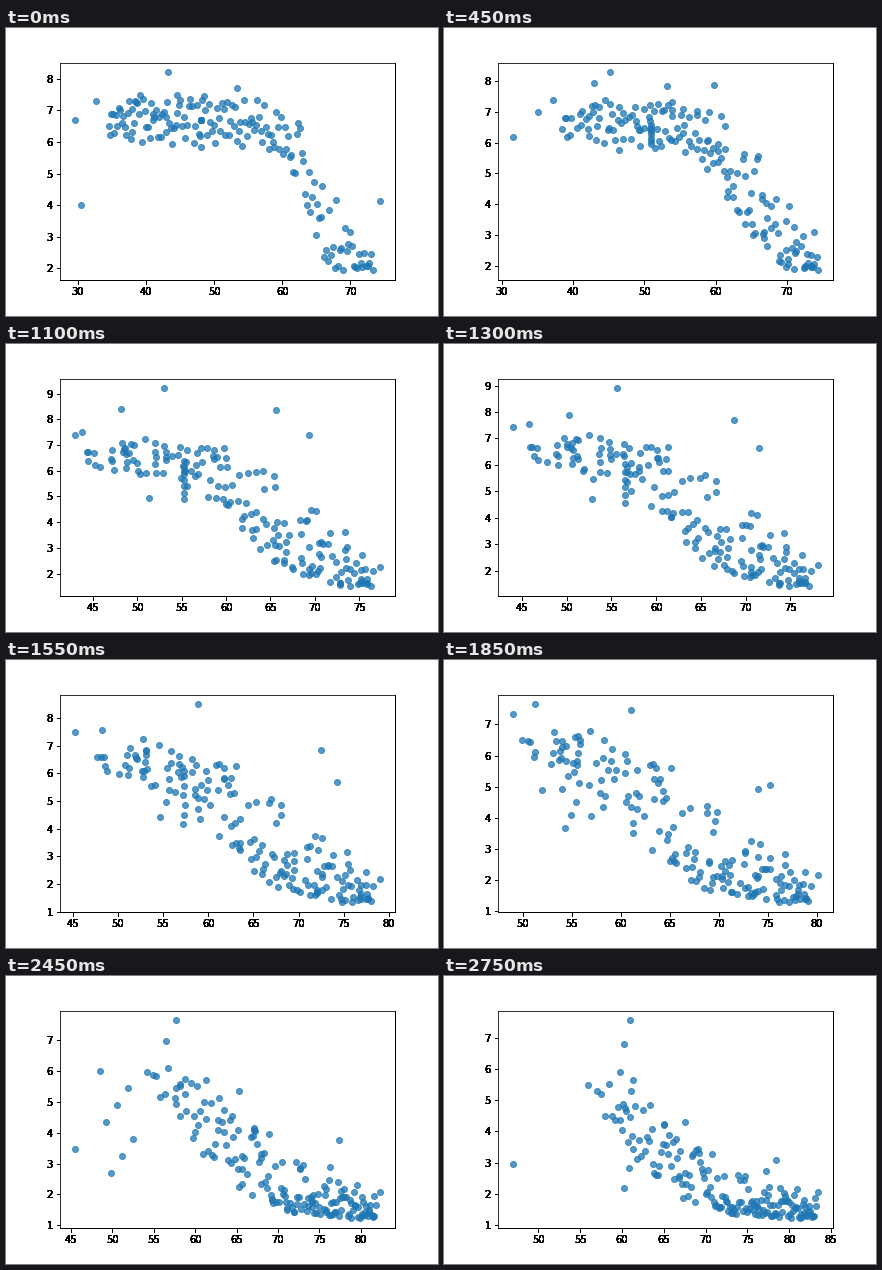
A matplotlib script that plays this animation: 432 px wide and 288 px high, repeating every 2.8 s.

```python
import numpy as np
import matplotlib.pyplot as plt
from matplotlib.animation import FuncAnimation
from matplotlib.axes import Axes

FRAMES = 56          # one frame per year
STEP_MS = 50
COUNT = 160

rng = np.random.default_rng(7)
rank_start = np.linspace(0, 1, COUNT)
shuffled = np.argsort(np.argsort(rank_start + rng.normal(0, 0.06, COUNT)))
rank_end = shuffled / (COUNT - 1)
share = rng.beta(1.5, 1.5, COUNT)

# Countries that stand apart: key points (year, life, births),
# then an optional sudden loss of life years (year, width, depth).
PATHS = [
    ([(0, 74.3, 4.13), (9, 73.8, 3.1), (22, 77.3, 2.25), (55, 83.4, 2.05)], None),
    ([(0, 38.5, 7.25), (15, 46, 8.4), (22, 53, 9.2), (31, 58.9, 8.5), (55, 67.5, 4.3)], None),
    ([(0, 44.6, 7.5), (22, 65.6, 8.35), (31, 72.5, 6.85), (43, 75.4, 3), (55, 77.2, 2.75)], None),
    ([(0, 53.3, 7.7), (15, 64, 8), (22, 69.4, 7.4), (31, 74.2, 5.7), (55, 78.4, 3.1)], None),
    ([(0, 32.7, 7.3), (43, 54.3, 7.7), (55, 61, 7.55)], None),
    ([(0, 29.6, 6.7), (22, 43, 7.4), (31, 45.3, 7.5), (55, 60.2, 6.8)], None),
    ([(0, 48, 5.85), (31, 60, 5.75), (43, 44, 4), (55, 47, 2.95)], None),
    ([(0, 43.2, 8.2), (22, 48.2, 8.4), (55, 65, 4.2)], (34, 0.5, 41)),
    ([(0, 38, 6.3), (55, 61.3, 5.65)], (8.5, 1.5, 11.4)),
    ([(0, 45, 4), (9, 59.2, 5.65), (22, 65.6, 2.55), (55, 76, 1.6)], (0, 1.2, 14.5)),
    ([(0, 41, 6.9), (22, 51, 5.9), (55, 66.8, 2.5)], (15.5, 2, 27.9)),
    ([(0, 43, 6.3), (55, 63.7, 2.95)], (50, 0.5, 30)),
]


def bell(x, centre, width):
    return np.exp(-((x - centre) / width) ** 2)


def fall(x, centre, width):
    """Smooth step from one down to zero."""
    return 1 / (1 + np.exp((x - centre) / width))


def crowd(year):
    """Most countries: life from rank, births between a low and a high curve."""
    t = year / (FRAMES - 1)
    shortest = 34.5 + 21.5 * t
    longest = 73.3 + 9.9 * t ** 1.2
    rank = rank_start + (rank_end - rank_start) * t
    life = shortest + (longest - shortest) * rank ** (0.65 + 0.4 * np.exp(-4 * t))

    floor = 1.2 + 0.7 * bell(t, 0, 0.38)
    low = floor + (5.8 - floor) * fall(life, 63 - 3 * t, 1.3 + 2.8 * np.sqrt(t))
    floor = 1.8 + 1.2 * np.exp(-5 * t)
    high = floor + (7.5 - 0.6 * t - floor) * fall(life, 66 + 5 * np.sin(np.pi * t), 2 + 4 * t)
    skew = 1.9 - 0.9 * fall(life, 63, 3)
    return np.column_stack([life, low + (high - low) * share ** skew])


def epidemic(year):
    """A group whose lives shorten for some years late in the run."""
    depth = np.linspace(17.5, 13, 7)
    decline = 0.8 + 3.7 * (np.arange(7) * 3 % 7) / 6
    life = 48 + 0.33 * year - depth * bell(year, 46, 9)
    births = 6.7 - decline * year / (FRAMES - 1)
    return np.column_stack([life, births])


def apart(path, year):
    points, loss = path
    years, lives, births = zip(*points)
    life = np.interp(year, years, lives)
    if loss:
        when, width, depth = loss
        life -= depth * bell(year, when, width)
    return life, np.interp(year, years, births)


def positions(year):
    return np.vstack([crowd(year), epidemic(year), [apart(p, year) for p in PATHS]])


class SolidAxes(Axes):
    """Axes whose outer parts are overdrawn until their edges are hard."""

    def draw(self, renderer):
        super().draw(renderer)
        outer = [self.xaxis, self.yaxis, self.spines["right"], self.spines["bottom"]]
        for _ in range(12):
            for part in outer:
                part.draw(renderer)


def padded(values):
    lo, hi = values.min(), values.max()
    pad = 0.05 * (hi - lo)
    return lo - pad, hi + pad


plt.rcParams.update({"font.family": "DejaVu Sans", "font.size": 10})
fig = plt.figure(figsize=(6, 4), dpi=72, facecolor="white")
ax = fig.add_axes([0.125, 0.125, 0.775, 0.755], axes_class=SolidAxes)
dots = ax.scatter(*positions(0).T, s=36, color="#1f77b4", alpha=0.75, linewidths=1)


def update(frame):
    points = positions(frame)
    dots.set_offsets(points)
    ax.set_xlim(padded(points[:, 0]))
    ax.set_ylim(padded(points[:, 1]))
    return [dots]


anim = FuncAnimation(fig, update, frames=FRAMES, interval=STEP_MS, repeat=True, repeat_delay=0)
plt.show()
```
